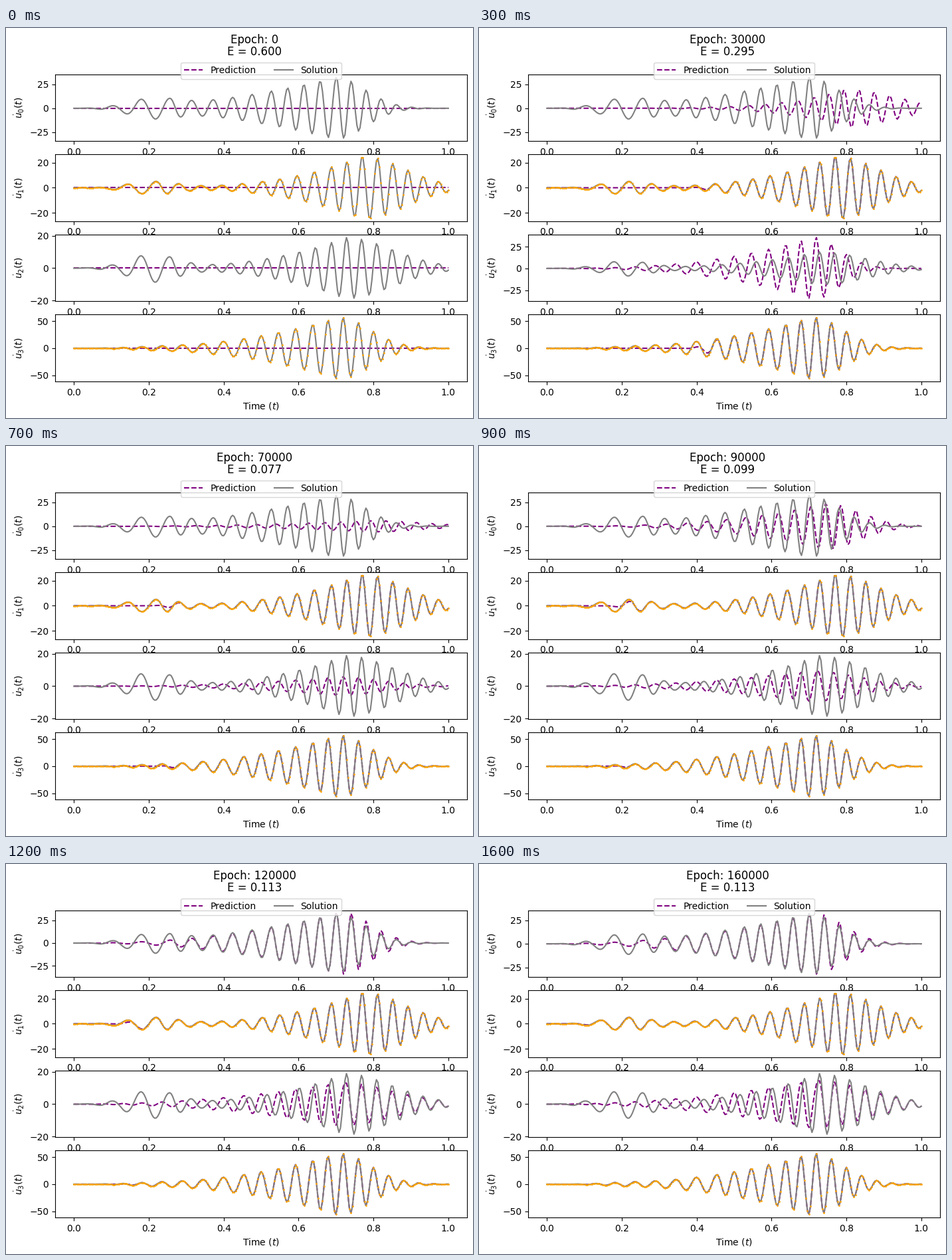
Write a matplotlib script that moves like this. It is 703 px wide and 587 px high and loops after 1700 ms.

```python
import matplotlib.pyplot as plt
import numpy as np
from matplotlib.animation import FuncAnimation

W, H, DPI = 703, 587, 100
LEFT, TOP, AX_W, AX_H = 74, 69.8, 620, 462
FRAMES = 17
t = np.linspace(0, 1, 251)

# Times at which each channel has completed these numbers of cycles.
CYCLES = [0, 2, 4, 7, 11, 14, 18]
CREST_TIMES = [
    [0.101, 0.257, 0.372, 0.5275, 0.701, 0.821, 0.985],
    [0.0635, 0.220, 0.340, 0.5035, 0.688, 0.811, 0.974],
    [0.099, 0.257, 0.3705, 0.516, 0.688, 0.809, 0.974],
    [0.080, 0.181, 0.289, 0.454, 0.638, 0.760, 0.922],
]


def phase(channel, lag=0):
    """Cycles completed at each time, linear between crest times."""
    crests = CREST_TIMES[channel]
    times = [0, *crests, crests[-1] + (crests[-1] - crests[-2]) / 2]
    return np.interp(t - lag, times, [-1.5, *CYCLES, CYCLES[-1] + 2])


def envelope(height, peak, power, width):
    """Power-law rise up to the peak, Gaussian fall after it."""
    rise = np.minimum(t / peak, 1) ** power
    fall = np.exp(-(np.maximum(t - peak, 0) / width) ** 2)
    return height * rise * fall


def oscillate(amplitude, cycles):
    return amplitude * np.cos(2 * np.pi * cycles)


def solve(channel, early, *main):
    swell = early * np.exp(-((t - 0.21) / 0.09) ** 2)
    return oscillate(swell + envelope(*main), phase(channel))


solution = [
    solve(0, 8.5, 32.5, 0.70, 2.1, 0.11),
    solve(1, 5.0, 25.2, 0.77, 3.8, 0.16),
    solve(2, 8.5, 19.0, 0.725, 3.4, 0.18),
    solve(3, 1.5, 57.3, 0.706, 2.65, 0.12),
]

# Training milestones, in units of 10000 epochs.
MILESTONES = [0, 3, 5, 7, 10, 12, 16]


def at_epoch(k, *values):
    return np.interp(k, MILESTONES, values)


def observed_fit(channel, k):
    """The fit creeps back in time from the loud part of the signal."""
    start = 0.6 * np.exp(-0.117 * k)
    return (k > 0) * solution[channel] / (1 + np.exp((start - t) / 0.015))


def first_fit(k, settled):
    height = at_epoch(k, 0, 20, 15.5, 6, 33, 34.5, 32.5)
    power = at_epoch(k, 5, 5, 3.7, 2.5, 3, 2.3, 2.15)
    amplitude = envelope(height, 0.8 - 0.085 * settled, power,
                         0.18 - 0.07 * settled)
    return oscillate(amplitude, phase(0, 0.0125 * (1 - settled)))


def third_fit(k, settled):
    """Follows the neighbouring channel, later its own after the peak."""
    height = at_epoch(k, 0, 36, 28, 6, 11.5, 13.5, 15)
    power = at_epoch(k, 2.7, 2.7, 2.4, 2.6, 2, 2.1, 2.1)
    width = at_epoch(k, 0.1, 0.1, 0.11, 0.16, 0.18, 0.2, 0.2)
    late = settled / (1 + np.exp((0.72 - t) / 0.006))
    cycles = phase(3) + late * (phase(2) + 1 - phase(3))
    return oscillate(envelope(height, 0.71, power, width), cycles)


def predictions(k):
    settled = np.clip((k - 7) / 3, 0, 1)
    return [first_fit(k, settled), observed_fit(1, k),
            third_fit(k, settled), observed_fit(3, k)]


fig, axes = plt.subplots(4, 1, figsize=(W / DPI, H / DPI), dpi=DPI)
fig.subplots_adjust(left=LEFT / W, right=(LEFT + AX_W) / W, hspace=0.2,
                    top=1 - TOP / H, bottom=1 - (TOP + AX_H) / H)
title = fig.suptitle("", x=(LEFT + 300) / W, y=1 - 8.6 / H, linespacing=1.0)

fits = []
for n, ax in enumerate(axes):
    fits += ax.plot(t, 0 * t, "--", color="purple", label="Prediction")
    ax.plot(t, solution[n], color="gray", label="Solution")
    if n % 2:
        ax.plot(t, solution[n], ".", color="orange", ms=2)
    ax.set_ylabel(rf"$\dot{{u}}_{n}(t)$")
axes[0].legend(loc="upper center", bbox_to_anchor=(0.5, 1.25), ncol=2)
axes[-1].set_xlabel("Time ($t$)")


def update(k):
    error = at_epoch(k, 0.600, 0.295, 0.101, 0.077, 0.110, 0.113, 0.113)
    title.set_text(f"Epoch: {k * 10000}\nE = {error:.3f}")
    for ax, fit, curve in zip(axes, fits, predictions(k)):
        fit.set_ydata(curve)
        ax.relim()
        ax.autoscale_view()
    return [title, *fits]


anim = FuncAnimation(fig, update, frames=FRAMES, interval=100,
                     repeat=True, repeat_delay=0, blit=False)
plt.show()
```
